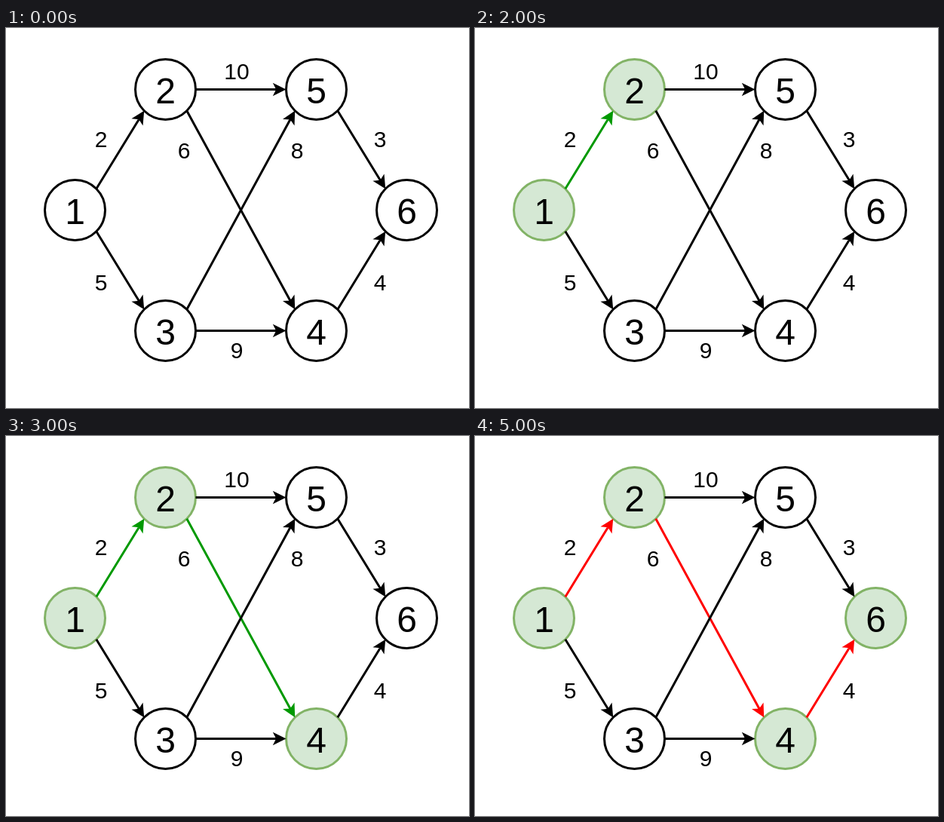
An HTML page that plays this animation: 614x504 px, repeating every 6000 ms.

```html
<!DOCTYPE html>
<html lang="en">
<head>
<meta charset="utf-8">
<title>Shortest path</title>
<style>
  html, body { margin: 0; width: 100%; height: 100%; overflow: hidden; background: #fff; }
  svg { display: block; width: 614px; height: 504px; }
  text { font-family: "Liberation Sans", Arial, sans-serif; text-anchor: middle; fill: #000; }
  .node { fill: #fff; stroke: #000; stroke-width: 3; }
  .edge { color: #000; fill: currentColor; stroke: currentColor; stroke-width: 3; stroke-miterlimit: 10; }
  .number { font-size: 48px; }
  .weight { font-size: 30px; }
</style>
</head>
<body>
<svg viewBox="0 0 614 504"></svg>
<script>
const LOOP = 6000, RADIUS = 40, STROKE = 3, HEAD = 11;
const FINAL = 5000;

// Node: centre and the time it is visited.
const nodes = {
  1: { x: 91.5, y: 241.5, at: 1000 },
  2: { x: 211.5, y: 81.5, at: 2000 },
  3: { x: 211.5, y: 401.5 },
  4: { x: 411.5, y: 401.5, at: 3000 },
  5: { x: 411.5, y: 81.5 },
  6: { x: 531.5, y: 241.5, at: 4000 }
};

// Edge: ends, weight, label centre and the time it joins the path.
const edges = [
  { from: 1, to: 2, weight: 2, x: 126, y: 147, at: 2000 },
  { from: 1, to: 3, weight: 5, x: 126, y: 337 },
  { from: 2, to: 5, weight: 10, x: 306, y: 57 },
  { from: 2, to: 4, weight: 6, x: 236, y: 162, at: 3000 },
  { from: 3, to: 5, weight: 8, x: 386, y: 162 },
  { from: 3, to: 4, weight: 9, x: 306, y: 427 },
  { from: 5, to: 6, weight: 3, x: 496, y: 147 },
  { from: 4, to: 6, weight: 4, x: 496, y: 337, at: 4000 }
];

const svg = document.querySelector("svg");

function add(tag, attrs, text = "") {
  const el = document.createElementNS("http://www.w3.org/2000/svg", tag);
  for (const key in attrs) el.setAttribute(key, attrs[key]);
  el.textContent = text;
  return svg.appendChild(el);
}

// Each step is [time, style]; every style holds until the next step.
function play(el, steps) {
  const frames = steps.map(([time, style]) => ({ offset: time / LOOP, easing: "steps(1, end)", ...style }));
  frames.push({ ...frames[frames.length - 1], offset: 1 });
  el.animate(frames, { duration: LOOP, iterations: Infinity }).startTime = 0;
}

// Edges meet circles at the side or at the 45 degree corner.
function port(node, other) {
  const dx = Math.sign(other.x - node.x), dy = Math.sign(other.y - node.y);
  const reach = RADIUS / Math.hypot(dx, dy);
  return { x: node.x + dx * reach, y: node.y + dy * reach };
}

function arrowPath(a, b) {
  const length = Math.hypot(b.x - a.x, b.y - a.y);
  const ux = (b.x - a.x) / length, uy = (b.y - a.y) / length;
  const tip = STROKE * 1.118;
  const point = (back, side) =>
    `${b.x - ux * back - uy * side} ${b.y - uy * back + ux * side}`;
  const notch = point(tip + HEAD * 0.75, 0);
  return `M${a.x} ${a.y}L${notch}M${point(tip, 0)}L${point(tip + HEAD, HEAD / 2)}` +
    `L${notch}L${point(tip + HEAD, -HEAD / 2)}Z`;
}

for (const [name, { x, y, at }] of Object.entries(nodes)) {
  const circle = add("circle", { class: "node", cx: x, cy: y, r: RADIUS });
  add("text", { class: "number", x, y: y + 18 }, name);
  if (at) play(circle, [
    [0, { fill: "#fff", stroke: "#000" }],
    [at, { fill: "#d5e8d4", stroke: "#82b366" }]
  ]);
}

for (const { from, to, weight, x, y, at } of edges) {
  const a = nodes[from], b = nodes[to];
  const path = add("path", { class: "edge", d: arrowPath(port(a, b), port(b, a)) });
  add("text", { class: "weight", x, y: y + 10.5 }, weight);
  if (at) play(path, [
    [0, { color: "#000" }],
    [at, { color: "#009900" }],
    [FINAL, { color: "#ff0000" }]
  ]);
}
</script>
</body>
</html>
```
